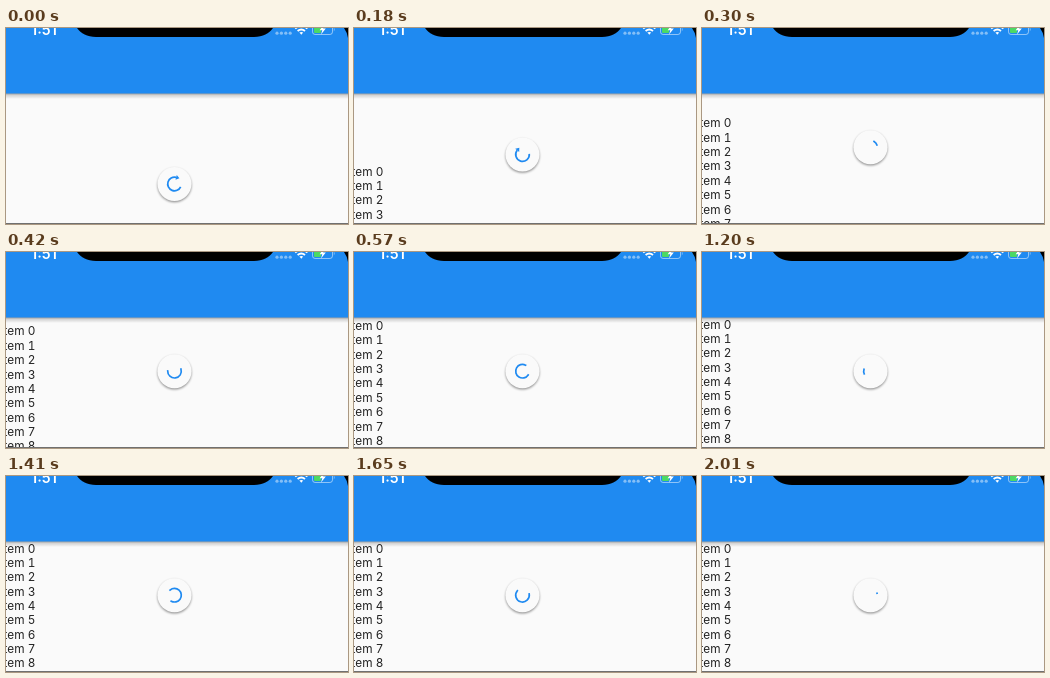
An HTML page for the animation above (2040 ms loop, 342 px wide and 196 px high).

```html
<!DOCTYPE html>
<html lang="en">
<head>
<meta charset="utf-8">
<title>Pull to refresh</title>
<style>
  html, body { margin: 0; width: 100%; height: 100%; overflow: hidden; background: #fafafa; }
  svg { display: block; width: 100vw; height: 100vh; }
  text { font-family: Inter, "Liberation Sans", sans-serif; }
  #list text { font-size: 11.8px; fill: #222; text-anchor: end; font-feature-settings: "tnum"; }
  #clock { font-size: 14.5px; font-weight: 600; fill: #fff; }
</style>
</head>
<body>
<svg viewBox="0 0 342 196">
  <defs>
    <linearGradient id="fade" x2="0" y2="1">
      <stop offset="0" stop-color="#000" stop-opacity=".4"/>
      <stop offset=".4" stop-color="#000" stop-opacity=".15"/>
      <stop offset="1" stop-color="#000" stop-opacity="0"/>
    </linearGradient>
    <filter id="soft" x="-30%" y="-30%" width="160%" height="160%">
      <feGaussianBlur stdDeviation="1.3"/>
    </filter>
  </defs>
  <rect width="342" height="196" fill="#fafafa"/>
  <g id="list"></g>

  <rect y="65" width="342" height="6" fill="url(#fade)"/>
  <rect width="342" height="65.5" fill="#1f8af1"/>
  <path d="M71 0C75 5.5 81 9 90 9H248C257 9 263 5.5 267 0Z"/>
  <path d="M338 0Q341 4 342 10V0Z"/>
  <text id="clock" x="25" y="7">1:51</text>
  <g fill="#fff" fill-opacity=".45">
    <circle cx="271" cy="5.2" r="1.6"/><circle cx="275.4" cy="5.2" r="1.6"/>
    <circle cx="279.8" cy="5.2" r="1.6"/><circle cx="284.2" cy="5.2" r="1.6"/>
  </g>
  <g fill="none" stroke="#fff" stroke-width="1.9">
    <path d="M289.2 .6Q295.3 -4.6 301.4 .6"/>
    <path d="M291.6 3Q295.3 0 299 3"/>
  </g>
  <path d="M293.4 4.6Q295.3 3.2 297.2 4.6L295.3 6.8Z" fill="#fff"/>
  <rect x="306.5" y="-3.5" width="20" height="10" rx="2.6" fill="none" stroke="#fff" stroke-opacity=".5"/>
  <path d="M327.8 -.5Q329.4 1.5 327.8 3.5Z" fill="#fff" fill-opacity=".5"/>
  <rect x="308" y="-2" width="7" height="7" rx="1" fill="#4cd964"/>
  <path d="M318.4 -4L313.6 2.2H316.3L315 6.6L319.8 .6H317.1Z" fill="#fff"/>

  <g id="knob">
    <circle cy="1.3" r="17" fill-opacity=".42" filter="url(#soft)"/>
    <circle r="17" fill="#fafafa"/>
    <path id="arc" fill="none" stroke="#1f8af1" stroke-width="1.7" stroke-linecap="square"/>
    <path id="tip" fill="#1f8af1"/>
  </g>
  <rect y="195" width="342" height="1" fill="#707070"/>
</svg>
<script>
const LOOP = 2040, STEP = 30, SPEED = 10 / 9;
const RELEASE = 80, SNAP = 150, CYCLE = 1000;
const RADIUS = 6.8, PI = Math.PI;
const KNOB = { x: 168.5, pulled: 156, rest: 119.2 };
const ROW = { x: 29.3, y: 76.5, gap: 14.37, pull: 136 };

const $ = id => document.getElementById(id);
const clamp = v => Math.min(1, Math.max(0, v));

for (let i = 0; i < 10; i++) {
  const row = document.createElementNS("http://www.w3.org/2000/svg", "text");
  row.setAttribute("x", ROW.x);
  row.setAttribute("y", ROW.y + i * ROW.gap);
  row.textContent = "Item " + i;
  $("list").append(row);
}

// cubic-bezier(.4, 0, .2, 1)
function ease(x) {
  x = clamp(x);
  let lo = 0, hi = 1;
  for (let i = 0; i < 24; i++) {
    const s = (lo + hi) / 2, r = 1 - s;
    if (1.2 * r * r * s + .6 * r * s * s + s * s * s < x) lo = s; else hi = s;
  }
  return lo * lo * (3 - 2 * lo);
}

// Overdamped spring released at rest, t in seconds
function spring(t) {
  const a = 9.07, b = 22.04;
  return t <= 0 ? 1 : (b * Math.exp(-a * t) - a * Math.exp(-b * t)) / (b - a);
}

const at = (angle, r) => [r * Math.cos(angle), r * Math.sin(angle)];
const pt = p => p.map(v => v.toFixed(3)).join(" ");

function drawSpinner(turns, arrow) {
  const step = Math.floor(turns), u = turns - step;
  const head = ease(u * 2), tail = ease(u * 2 - 1);
  const start = -PI / 2 + tail * 1.5 * PI + u * 1.7 * PI - step * .8 * PI;
  const sweep = Math.max((head - tail) * 1.5 * PI, .01);
  const end = start + sweep;
  $("arc").setAttribute("d", `M${pt(at(start, RADIUS))}A${RADIUS} ${RADIUS} 0 ${+(sweep > PI)} 1 ${pt(at(end, RADIUS))}`);
  $("arc").setAttribute("stroke-linecap", arrow ? "butt" : "square");
  if (!arrow) return $("tip").setAttribute("d", "");
  const [x, y] = at(end, RADIUS);
  const nose = [x - Math.sin(end) * 3.4, y + Math.cos(end) * 3.4];
  $("tip").setAttribute("d", `M${pt(at(end, RADIUS - 2.55))}L${pt(at(end, RADIUS + 2.55))}L${pt(nose)}Z`);
}

function draw(ms) {
  const t = ms * SPEED;
  const snap = clamp((t - RELEASE) / SNAP);
  const spin = t - RELEASE - SNAP;
  const y = KNOB.pulled + (KNOB.rest - KNOB.pulled) * snap;
  $("list").setAttribute("transform", `translate(0 ${ROW.pull * spring((t - RELEASE) / 1000)})`);
  $("knob").setAttribute("transform", `translate(${KNOB.x} ${y})`);
  if (spin < 0) drawSpinner(.375 - .125 * snap, true);
  else drawSpinner(spin / CYCLE, false);
}

const origin = performance.now();
function tick() {
  const ms = (performance.now() - origin) % LOOP;
  draw(Math.floor(ms / STEP) * STEP);
  requestAnimationFrame(tick);
}
tick();
</script>
</body>
</html>
```
